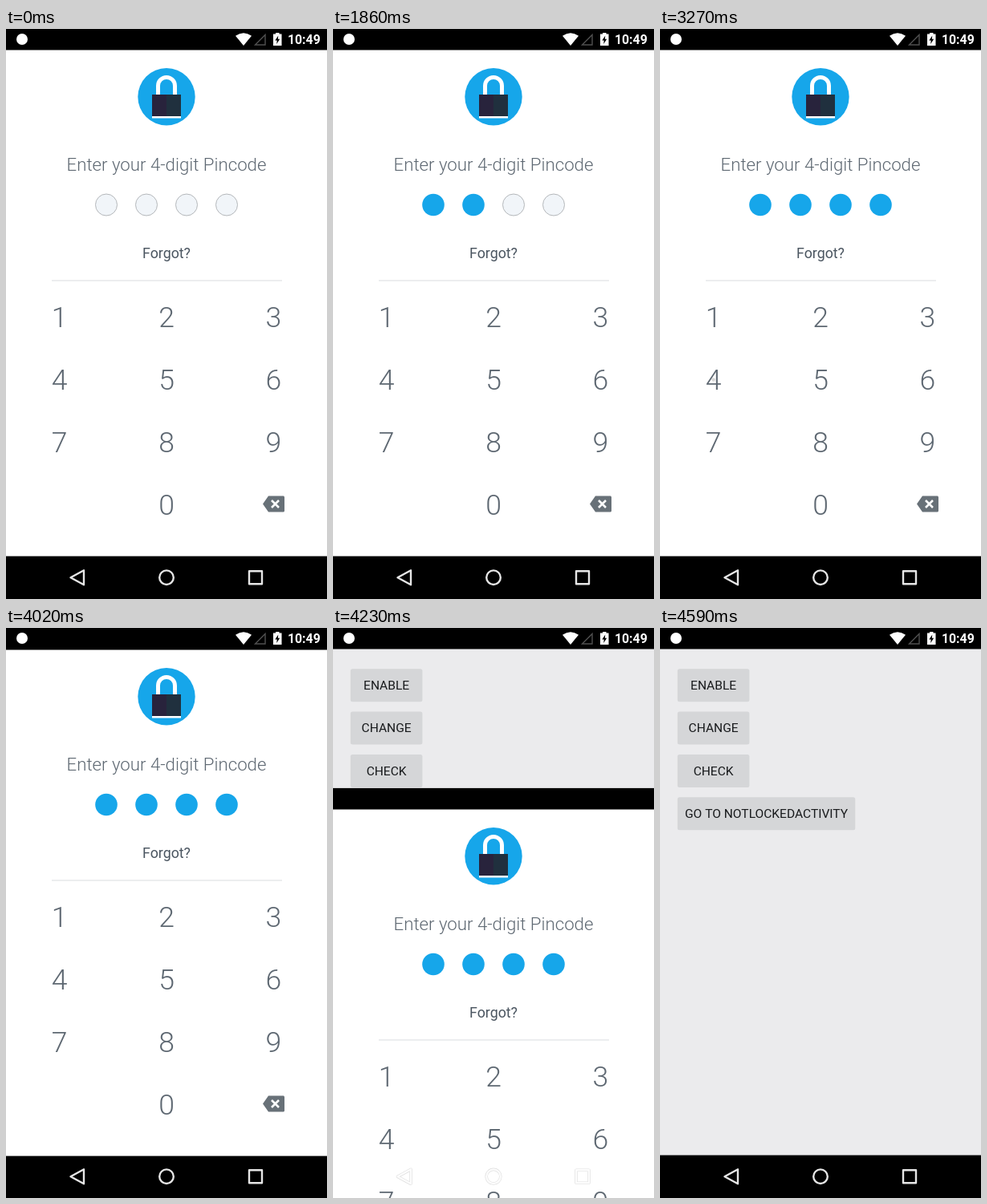
Recreate the animation shown at these times as an HTML page with a canvas. Size 400 by 712 pixels, loop 5.59 s.

```html
<!DOCTYPE html>
<html lang="en">
<head>
<meta charset="utf-8">
<title>Pincode unlock</title>
<style>
html, body { margin: 0; width: 100%; height: 100%; overflow: hidden; background: #000; }
canvas { display: block; }
</style>
</head>
<body>
<canvas id="stage" width="400" height="712"></canvas>
<script>
const ctx = document.getElementById('stage').getContext('2d');
const W = 400, H = 712, LOOP = 5590, TICK = 30;
const TOP = 0.9, STATUS_BOTTOM = 27.5, NAV_Y = 658.6;
const BLUE = '#16a6ea', SLATE = '#4a5560', LIGHT_SLATE = '#5e6872';
const PRESSES = [1230, 1860, 2430, 3240];
const RIPPLE = { duration: 400, radius: 30, alpha: 90 / 255 };
const SLIDE = { visible: 4020, start: 4019.2, duration: 592, end: 4590 };

function rect(x, y, w, h, color) {
  ctx.fillStyle = color;
  ctx.fillRect(x, y, w, h);
}

function disc(x, y, r, color) {
  ctx.fillStyle = color;
  ctx.beginPath();
  ctx.arc(x, y, r, 0, Math.PI * 2);
  ctx.fill();
}

function polygon(points) {
  ctx.beginPath();
  points.forEach(([x, y]) => ctx.lineTo(x, y));
  ctx.closePath();
}

function fillPolygon(points, color) {
  ctx.fillStyle = color;
  polygon(points);
  ctx.fill();
}

function stroke(color, width) {
  ctx.strokeStyle = color;
  ctx.lineWidth = width;
  ctx.stroke();
}

function text(str, x, y, size, weight, color, align = 'center') {
  ctx.font = `${weight} ${size}px Roboto, sans-serif`;
  ctx.textAlign = align;
  ctx.fillStyle = color;
  ctx.fillText(str, x, y);
}

function drawLock() {
  disc(200, 85.8, 35.7, BLUE);
  ctx.beginPath();
  ctx.moveTo(189.5, 84);
  ctx.lineTo(189.5, 72);
  ctx.arc(200, 72, 10.5, Math.PI, 0);
  ctx.lineTo(210.5, 84);
  stroke('#fff', 5);
  rect(182, 83, 18, 27, '#28233c');
  rect(200, 83, 18, 27, '#20303e');
  rect(182, 110, 36, 2.5, '#fff');
}

function drawBackspace() {
  fillPolygon([[320, 593.5], [327, 583.5], [346, 583.5], [347, 584.5],
    [347, 602.5], [346, 603.5], [327, 603.5]], '#687178');
  ctx.beginPath();
  ctx.moveTo(331, 589);
  ctx.lineTo(340, 598);
  ctx.moveTo(340, 589);
  ctx.lineTo(331, 598);
  stroke('#fff', 2.6);
}

function keyCenter(digit) {
  const row = digit ? Math.floor((digit - 1) / 3) : 3;
  const column = digit ? (digit - 1) % 3 : 1;
  return [W * (column * 2 + 1) / 6, 360.5 + row * 78];
}

function drawRipple(digit, age) {
  const p = age / RIPPLE.duration;
  if (p <= 0 || p >= 1) return;
  const [x, y] = keyCenter(digit);
  ctx.globalAlpha = RIPPLE.alpha * (1 - p);
  disc(x, y, RIPPLE.radius * p, '#808080');
  ctx.globalAlpha = 1;
}

function drawPinScreen(t) {
  rect(0, TOP, W, H, '#000');
  rect(0, STATUS_BOTTOM, W, NAV_Y - STATUS_BOTTOM, '#fff');
  drawLock();
  text('Enter your 4-digit Pincode', 200, 178, 22.22, 300, LIGHT_SLATE);
  PRESSES.forEach((time, i) => {
    const x = 125 + i * 50;
    if (t >= time) {
      disc(x, 220.5, 13.8, BLUE);
    } else {
      disc(x, 220.5, 13.5, '#f1f5f9');
      stroke('#b4b7ba', 1);
    }
  });
  text('Forgot?', 200, 287, 17.78, 400, SLATE);
  rect(57, 314.2, 287, 1.5, '#e6e8ea');
  for (let digit = 0; digit < 10; digit++) {
    const [x, y] = keyCenter(digit);
    text(digit, x, y + 12.5, 35.56, 300, LIGHT_SLATE);
  }
  drawBackspace();
  PRESSES.forEach((time, i) => drawRipple(i + 1, t - time));
}

function drawButton(label, y, w) {
  ctx.fillStyle = '#d5d6d8';
  ctx.beginPath();
  ctx.roundRect(21.8, y, w, 41, 2.5);
  ctx.fill();
  text(label, 21.8 + w / 2, y + 25.7, 15.56, 400, '#181a1c');
}

function drawMenuScreen(finished) {
  rect(0, 0, W, H, '#ebebed');
  rect(0, TOP, W, STATUS_BOTTOM - TOP, '#000');
  if (finished) rect(0, NAV_Y, W, H - NAV_Y, '#000');
  drawButton('ENABLE', 52.3, 89.6);
  drawButton('CHANGE', 105.6, 89.6);
  drawButton('CHECK', 159, 89.6);
  drawButton('GO TO NOTLOCKEDACTIVITY', 212.3, 221.5);
}

function drawStatusIcons() {
  disc(20, 14, 7, '#fff');
  ctx.fillStyle = '#fff';
  ctx.beginPath();
  ctx.moveTo(296, 22);
  ctx.lineTo(286, 9.8);
  ctx.quadraticCurveTo(296, 2.6, 306, 9.8);
  ctx.fill();
  polygon([[310.5, 21], [323, 21], [323, 8.5]]);
  stroke('#505050', 1.4);
  rect(336, 6, 4.5, 3, '#fff');
  rect(333, 7.5, 10.5, 14.5, '#fff');
  fillPolygon([[339.3, 9.5], [335.3, 15.5], [337.7, 15.5], [337.2, 20],
    [341.2, 13.7], [338.8, 13.7]], '#000');
  text('10:49', 391.7, 20, 15.8, 600, '#fff', 'right');
}

function drawNavIcons() {
  const outline = trace => {
    trace();
    stroke('rgba(0,0,0,.13)', 3.6);
    stroke('rgba(255,255,255,.9)', 2.4);
  };
  ctx.lineJoin = 'round';
  outline(() => polygon([[80.5, 685.3], [97, 676.3], [97, 694.3]]));
  outline(() => {
    ctx.beginPath();
    ctx.arc(200, 685.2, 8.8, 0, Math.PI * 2);
  });
  outline(() => {
    ctx.beginPath();
    ctx.rect(303, 677.3, 16, 16);
  });
  ctx.lineJoin = 'miter';
}

function slideOffset(t) {
  if (t < SLIDE.visible) return 0;
  const p = Math.min((t - SLIDE.start) / SLIDE.duration, 1);
  return Math.max(1, Math.round(H * (0.5 - 0.5 * Math.cos(Math.PI * p))));
}

function render(t) {
  const finished = t >= SLIDE.end;
  drawMenuScreen(finished);
  if (!finished) {
    ctx.save();
    ctx.translate(0, slideOffset(t));
    drawPinScreen(t);
    ctx.restore();
  }
  rect(0, 0, W, TOP, '#fff');
  drawStatusIcons();
  drawNavIcons();
}

const startTime = performance.now();

function frame() {
  const t = (performance.now() - startTime) % LOOP;
  render(Math.floor(t / TICK) * TICK);
  requestAnimationFrame(frame);
}
frame();
</script>
</body>
</html>
```
